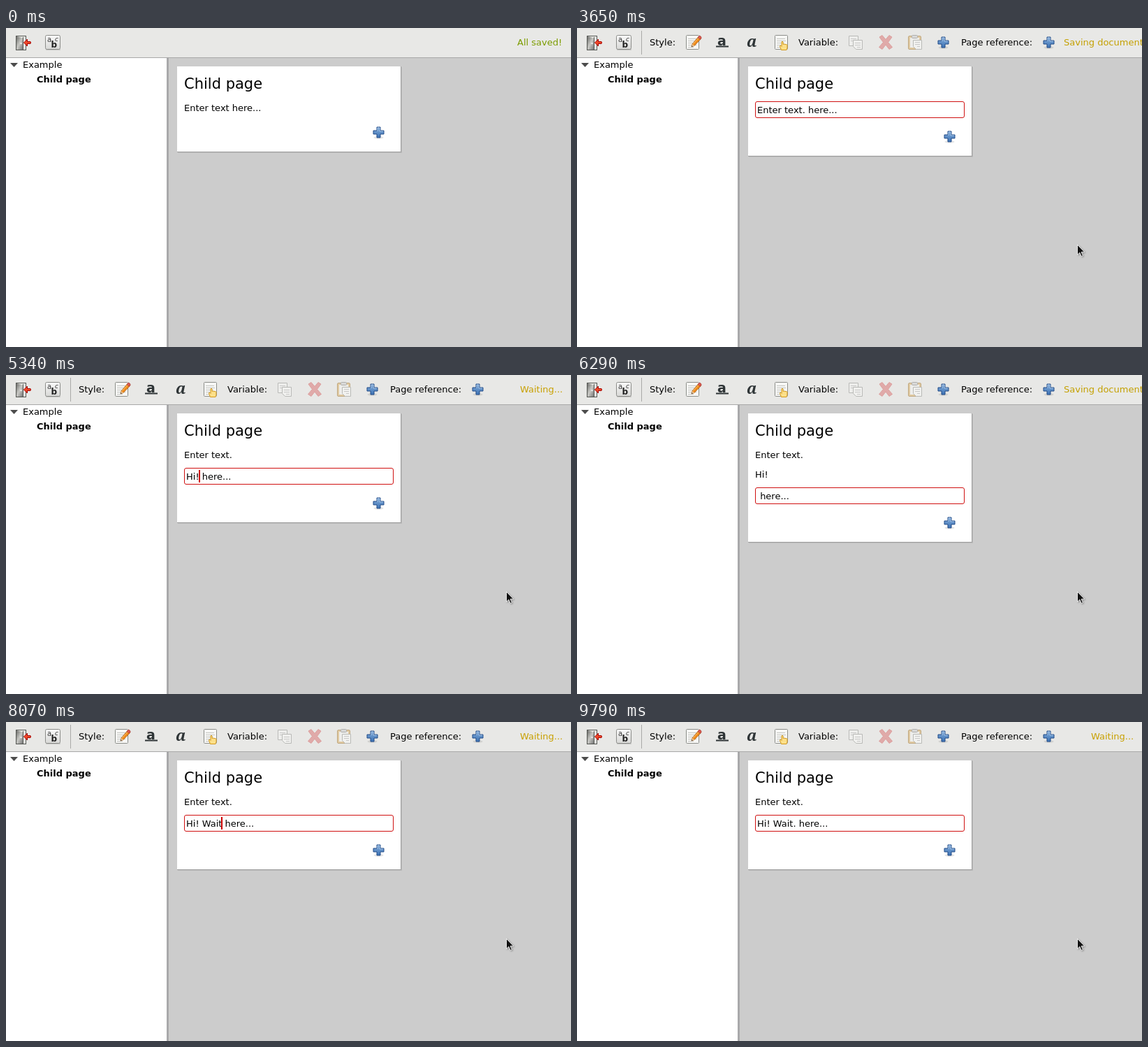
Recreate the animation shown at these times as an HTML page. Size 809x457 px, loop 9.89 s.

```html
<!DOCTYPE html>
<html lang="en">
<head>
<meta charset="utf-8">
<title>Page editor</title>
<style>
html, body { margin: 0; width: 100%; height: 100%; overflow: hidden; background: #ccc; }
svg { display: block; width: 809px; height: 457px; }
text { font: 13px "DejaVu Sans", Verdana, sans-serif; white-space: pre; }
</style>
</head>
<body>
<svg viewBox="0 0 809 457" xmlns="http://www.w3.org/2000/svg">
  <defs>
    <linearGradient id="blue" x1="0" y1="0" x2="0" y2="1">
      <stop offset="0" stop-color="#86aedb"/><stop offset="1" stop-color="#3d73b5"/>
    </linearGradient>
    <linearGradient id="metal" x1="0" y1="0" x2="1" y2="1">
      <stop offset="0" stop-color="#6a6a68"/><stop offset=".5" stop-color="#c8c8c4"/><stop offset="1" stop-color="#777"/>
    </linearGradient>
    <linearGradient id="key" x1="0" y1="0" x2="0" y2="1">
      <stop offset="0" stop-color="#fafafa"/><stop offset="1" stop-color="#d8d8d6"/>
    </linearGradient>
    <g id="plus">
      <ellipse cx="0" cy="7.5" rx="7" ry="1.8" opacity=".1"/>
      <path d="M-2.5-7.5h5v5h5v5h-5v5h-5v-5h-5v-5h5z" fill="url(#blue)" stroke="#204a87" stroke-linejoin="round"/>
      <path d="M-1.5-1.5v-5h3v5h5" fill="none" stroke="#b4cfec" opacity=".7"/>
    </g>
    <g id="sheet">
      <rect x=".5" y=".5" width="18" height="20" rx="1" fill="#f7f7f5" stroke="#8c8e8a"/>
      <path d="M3 5.5h12M3 8.5h13M3 11.5h11M3 14.5h12M3 17.5h8" stroke="#c2c3c0"/>
    </g>
    <clipPath id="inner"><rect x="258" y="1" width="296" height="22"/></clipPath>
  </defs>

  <rect width="809" height="457" fill="#ccc"/>
  <rect y="43" width="230" height="414" fill="#fff"/>
  <rect x="230" y="43" width="3" height="414" fill="#a9a9ab"/>
  <rect width="809" height="42" fill="#e8e8e6"/>
  <rect y="42" width="809" height="1" fill="#a8a8a8"/>

  <g id="exit">
    <rect x="14.5" y="11.5" width="14" height="20" fill="#efefec" stroke="#555753"/>
    <path d="M15 12l9 2v17H15z" fill="url(#metal)"/>
    <path d="M24.500 13v18" stroke="#555753"/>
    <circle cx="21.500" cy="22" r="1.200" fill="#eee"/>
    <path d="M25.500 21l5-5v3.500h4.500q1 1.500 0 3h-4.500V26z" fill="#ef4a2a" stroke="#a40000" stroke-linejoin="round"/>
  </g>
  <g id="spell">
    <rect x="57" y="30" width="21" height="2" rx="1" opacity=".15"/>
    <rect x="56.500" y="10.500" width="21" height="20" rx="2" fill="url(#key)" stroke="#8b8c89"/>
    <text x="59" y="20" style="font-size:10px" fill="#333">a</text>
    <text x="64.500" y="28" style="font-size:12px;font-weight:bold" fill="#222">b</text>
    <text x="70" y="19" style="font-size:9px;font-style:italic" fill="#333">c</text>
  </g>

  <g id="tools">
    <rect x="92" y="4" width="1" height="34" fill="#a9a9a7"/>
    <text x="104" y="25">Style:</text>
    <g transform="translate(156 10)">
      <use href="#sheet"/>
      <path d="M8 17l1-4L18 2.500l3.500 3L12 15.500z" fill="#f08c1c" stroke="#a85a10" stroke-width=".8"/>
      <path d="M10 13L18.500 4" stroke="#fcc36b"/>
      <path d="M17 3.500l1.500-2q1-1 2.500.3t1 2.700l-1.500 2z" fill="#dc5a50" stroke="#99382f" stroke-width=".6"/>
      <path d="M8 17l1-4 3 2.500z" fill="#e9c9a0"/><path d="M8 17l.4-1.700 1.300 1z" fill="#222"/>
    </g>
    <text x="201" y="25" style="font:bold 19px 'DejaVu Sans',sans-serif" fill="#2e3436">a</text>
    <path d="M199 26.500h18" stroke="#2e3436" stroke-width="2"/>
    <text x="243" y="27" style="font:italic bold 22px 'Noto Serif','Liberation Serif',serif" fill="#2e3436">a</text>
    <g transform="translate(283 10)">
      <use href="#sheet"/>
      <path d="M9.500 21.500l-2-5q-.4-1.500 1.500-1l1 1V10q1-1.500 2 0v3.500q1-1 2 0 1-.8 2 .2 1.500-.6 2 .8v4l-1 3z" fill="#fce08a" stroke="#d59a1c"/>
    </g>
    <text x="317" y="25">Variable:</text>
    <g opacity=".5" transform="translate(389 11)">
      <path d="M.5.500h13v14H.500z" fill="#f4f4f2" stroke="#8c8e8a"/>
      <path d="M3 4.500h8M3 7.500h8" stroke="#aaa"/>
      <path d="M6.500 6.500h13v13h-9l-4-4z" fill="#f8f8f6" stroke="#8c8e8a"/>
      <path d="M9 10.500h8M9 13.500h8M12 16.500h5" stroke="#aaa"/>
    </g>
    <path opacity=".45" d="M433 13l4-2.500 5 6 5-6 4 2.500-5.500 7.500 6 7-4.500 3-5-6.500-5 6.500-4.500-3 6-7z" fill="#d86060" stroke="#cc4444" stroke-linejoin="round"/>
    <g opacity=".5" transform="translate(474 10)">
      <rect x=".5" y="1.500" width="18" height="19" rx="1.500" fill="#d9ad62" stroke="#9a6a1c"/>
      <rect x="3" y="4" width="13" height="14" fill="#f5f5f3"/>
      <rect x="5.500" y=".5" width="8" height="4" rx="1" fill="#ccc" stroke="#777"/>
      <path d="M7.500 7.500h12v13h-8l-4-4z" fill="#fafaf8" stroke="#8c8e8a"/>
      <path d="M10 10.500h7M10 13.500h7M13 16.500h4" stroke="#aaa"/>
    </g>
    <use href="#plus" x="524.500" y="20.500"/>
    <text x="550" y="25">Page reference:</text>
    <use href="#plus" x="675.500" y="20.500"/>
  </g>
  <text id="status" y="25"></text>

  <path d="M6 50h11l-5.500 6z" fill="#4c4c4c"/>
  <text x="24" y="57">Example</text>
  <text x="44" y="78" font-weight="bold" style="font-weight:bold">Child page</text>

  <rect class="card" x="246" y="56" width="321" fill="#b9b9b9"/>
  <rect class="card" x="245" y="55" width="321" fill="#a2a2a2"/>
  <rect class="card" x="245" y="55" width="320" fill="#fff"/>
  <text x="255" y="87" style="font-size:21px">Child page</text>
  <text class="para" x="255" y="119"></text>
  <text class="para" x="255" y="147"></text>
  <g id="field">
    <rect x="255.500" y=".5" width="299" height="23" rx="2.500" fill="#fff" stroke="#d01010"/>
    <text id="input" x="258" y="17"></text>
    <rect id="caret" y="3" width="2" height="18" fill="#c00" clip-path="url(#inner)"/>
  </g>
  <use id="add" href="#plus" x="533.500"/>

  <g id="pointer">
    <path id="arrow" d="M.5.500v14.500l3.300-3.200 2.400 5.400 2.300-1-2.400-5.200h4.600z" fill="#111" stroke="#fff" stroke-width=".9" style="filter:drop-shadow(1px 1px 1px #0005)"/>
    <path id="beam" d="M-3-9.500h2.500l.5 1 .5-1H3M0-9V8M-3 8.500h2.500l.5-1 .5 1H3" fill="none" stroke="#111"/>
  </g>
</svg>
<script>
const LOOP = 9890, BLINK = 388, LINE = 28;
const $ = id => document.getElementById(id);
const all = name => [...document.getElementsByClassName(name)];
const cards = all("card"), paras = all("para");

// Document after each edit; "|" marks the caret, lines are paragraphs
const edits = [
  [0, "Enter text here..."],
  [1330, "Enter text| here..."],
  [3040, "Enter text.| here..."],
  [3800, "Enter text.\n| here..."],
  [4790, "Enter text.\nH| here..."],
  [5150, "Enter text.\nHi| here..."],
  [5340, "Enter text.\nHi!| here..."],
  [5690, "Enter text.\nHi!\n| here..."],
  [6450, "Enter text.\nHi!| here..."],
  [7450, "Enter text.\nHi! | here..."],
  [7620, "Enter text.\nHi! W| here..."],
  [7790, "Enter text.\nHi! Wa| here..."],
  [7950, "Enter text.\nHi! Wai| here..."],
  [8070, "Enter text.\nHi! Wait| here..."],
  [8280, "Enter text.\nHi! Wait.| here..."],
  [8740, "Enter text.\nHi! Wait.\n| here..."],
  [9400, "Enter text.\nHi! Wait.| here..."]
];

const SAVED = ["All saved!", 732, "#7c9c00"];
const WAITING = ["Waiting...", 736, "#c8a000"];
const SAVING = ["Saving document...", 697, "#c4a000"];
const statuses = [
  [0, SAVED], [3080, WAITING], [3650, SAVING], [3850, WAITING],
  [4450, SAVING], [4650, SAVED], [4830, WAITING], [6290, SAVING],
  [6490, WAITING], [7090, SAVING], [7290, SAVED], [7490, WAITING],
  [9340, SAVING], [9440, WAITING]
];

const latest = (list, t) => list.filter(([at]) => at <= t).pop();
const show = (el, on) => el.setAttribute("visibility", on ? "inherit" : "hidden");
const set = (el, attrs) => { for (const k in attrs) el.setAttribute(k, attrs[k]); };

function drawPage(t) {
  const [at, doc] = latest(edits, t);
  const lines = doc.split("\n");
  const editing = doc.includes("|");
  const row = lines.length - 1;
  const grow = row * LINE + (editing ? 6 : 0);

  cards.forEach((card, i) => set(card, { height: 122 + grow + (i < 2 ? (i ? 1 : 2) - i * 0 - (i ? 0 : 1) : 0) }));
  paras.forEach((p, i) => p.textContent = i < row || !editing ? lines[i] || "" : "");
  set($("add"), { y: 149.5 + grow });
  show($("field"), editing);
  if (!editing) return;

  const input = $("input"), [before, after] = lines[row].split("|");
  set($("field"), { transform: `translate(0 ${105 + row * LINE})` });
  input.textContent = before + after;
  const width = before ? input.getSubStringLength(0, before.length) : 0;
  set($("caret"), { x: 257 + Math.round(width) });
  show($("caret"), Math.floor((t - at) / BLINK) % 2 === 0);
}

function drawPointer(t) {
  show($("pointer"), t >= 1740);
  const step = 1860 + Math.floor((t - 1860) / 40) * 40;
  const p = Math.min(1, Math.max(0, (step - 1752) / 318));
  const ease = p * p * (3 - 2 * p);
  const x = Math.round(321 + 395 * ease), y = Math.round(119 + 191 * ease);
  set($("pointer"), { transform: `translate(${x} ${y})` });
  show($("arrow"), y >= 129);
  show($("beam"), y < 129);
}

function draw(t) {
  const [label, x, fill] = latest(statuses, t)[1];
  $("status").textContent = label;
  set($("status"), { x, fill });
  show($("tools"), t >= 1370);
  drawPage(t);
  drawPointer(t);
}

const start = performance.now();
function tick() {
  draw((performance.now() - start) % LOOP);
  requestAnimationFrame(tick);
}
tick();
</script>
</body>
</html>
```
